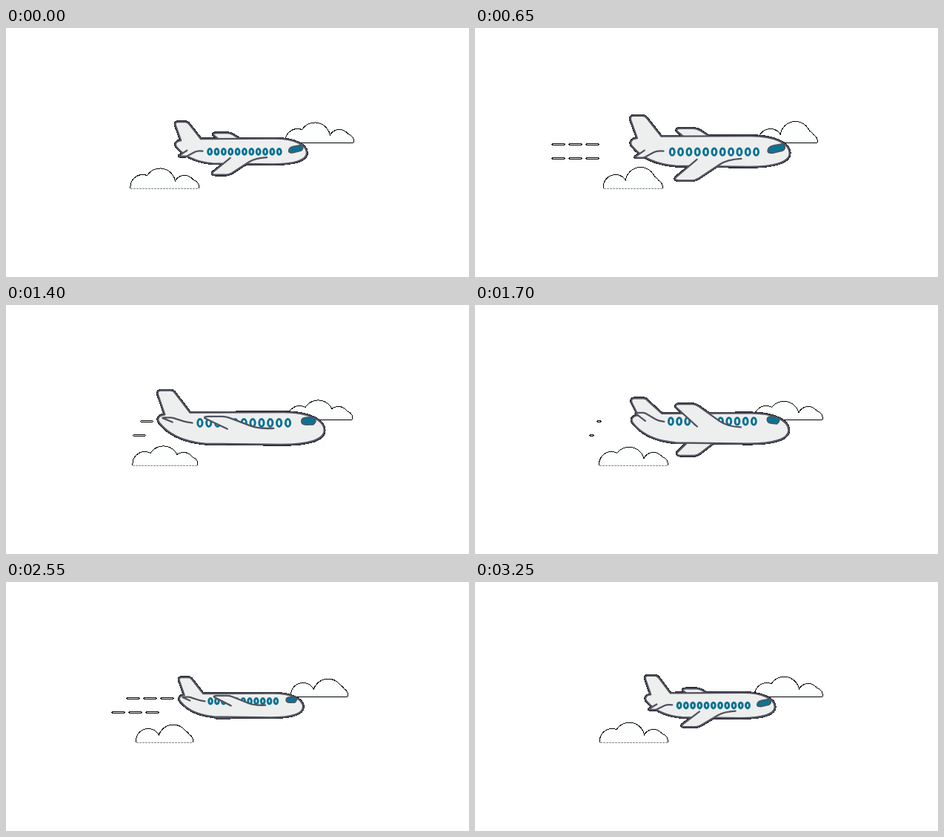
An HTML page for the animation above (3300 ms loop, 625x337 px).

```html
<!DOCTYPE html>
<html lang="en">
<head>
<meta charset="utf-8">
<title>Airplane</title>
<style>
  html, body { margin: 0; width: 100%; height: 100%; overflow: hidden; background: #fff; }
  svg { display: block; width: 625px; height: 337px; }
  .crisp, .rim { shape-rendering: crispEdges; }
  .skin { fill: #edefee; stroke: #53525f; stroke-width: 2.3; stroke-linejoin: round; stroke-linecap: round; }
  .rim { fill: none; stroke: #16161c; stroke-width: 3.8; stroke-linejoin: round; }
  .pane { fill: #f4f8f9; stroke: #0d7292; stroke-width: 3; }
  .skin, .rim, .pane { vector-effect: non-scaling-stroke; }
  .cockpit { fill: #0d7292; stroke-width: 1.5; }
  .edge { fill: none; stroke: #000; stroke-width: 2; }
  .puff { fill: #fdfefe; }
  .base, .trail { fill: none; stroke: #000; }
</style>
</head>
<body>
<svg viewBox="0 0 625 337">
  <defs><clipPath id="hull"><path id="hullShape"/></clipPath></defs>
  <g id="clouds" class="crisp"></g>
  <path id="trails" class="trail crisp"/>
  <g id="plane"></g>
</svg>
<script>
const LOOP = 3300, STEP = 50;
const NS = 'http://www.w3.org/2000/svg';
const $ = id => document.getElementById(id);
const clamp = v => Math.max(0, Math.min(1, v));
const wave = (t, peak, period = LOOP) => Math.cos(2 * Math.PI * (t - peak) / period);

function add(parent, tag, attrs) {
  const el = document.createElementNS(NS, tag);
  for (const name in attrs) el.setAttribute(name, attrs[name]);
  return parent.appendChild(el);
}

const clouds = [[0, 0, '3 1', '#888'], [209, -62, 'none', '#000']].map(([x, y, dash, stroke]) => {
  const g = add($('clouds'), 'g', { transform: `translate(${x} ${y})` });
  return {
    edge: add(g, 'path', { class: 'edge' }),
    puff: add(g, 'path', { class: 'puff' }),
    base: add(g, 'path', { class: 'base', style: `stroke:${stroke};stroke-dasharray:${dash}` })
  };
});

const plane = $('plane');
const part = className => add(plane, 'path', { class: className });
const rim = part('rim');
const far = part('skin');
const hull = part('skin');
const panes = Array.from({ length: 11 }, () => add(plane, 'ellipse', { class: 'pane', rx: 2.4, ry: 3.8 }));
const cockpit = part('skin cockpit');
cockpit.setAttribute('clip-path', 'url(#hull)');
const tail = part('skin');
const near = part('skin');

// A swept wing seen from the side: root position, size, tip and root heights
function wing(x, size, tip, root) {
  const span = tip - root, at = dx => x + dx * size;
  return `M${x} ${root}L${at(-23.5)} ${tip - span * .14}Q${at(-25)} ${tip} ${at(-20)} ${tip}`
    + `L${at(-5)} ${tip}Q${at(-2)} ${tip} ${at(2)} ${tip - span * .1}`
    + `L${at(24.5)} ${root + span * .25}Q${at(33)} ${root} ${at(48.5)} ${root - Math.sign(root) * .8}`;
}

function drawPlane(t, scale) {
  const roll = wave(t, 335);
  plane.setAttribute('transform', `translate(317.5 167) scale(${scale})`);

  const fin = -43 + 9.5 * roll * roll - 3 * roll;
  const body = 'M-53.5-16.5L45-17C70-17 87-9 87 2C87 12 70 17 42 17L-38 16'
    + 'C-60 14-76 6-85-5C-89-9-87-14-80-14.5'
    + `L-87 ${fin + 5}Q-88.5 ${fin} -84 ${fin}L-74 ${fin}Q-71 ${fin} -69 ${fin + 3}Z`;
  const farTip = 2 - 33 * roll;
  const farWing = wing(-13, 1, farTip, farTip * .12);
  const nearWing = wing(-14.5, 1, 3 + 35 * roll, 3.5 + 6.5 * roll);
  const tailWing = wing(-72, .43, 14.5 * roll - 5, 4.3 * roll - 4.7);
  hull.setAttribute('d', body);
  $('hullShape').setAttribute('d', body);
  far.setAttribute('d', farWing);
  near.setAttribute('d', nearWing);
  tail.setAttribute('d', tailWing);
  rim.setAttribute('d', body + farWing + nearWing + tailWing);

  panes.forEach((pane, i) => {
    pane.setAttribute('cx', 3.4 + 1.2 * roll + (i - 5) * 9.2);
    pane.setAttribute('cy', 5 * roll - 3.6);
  });

  const y = 3.8 * roll - 6, end = 81.6 + 3 * roll, h = 4.3 + .8 * roll, tilt = 1 + 2 * roll;
  cockpit.setAttribute('d', `M63 ${y + tilt}Q63 ${y - h + tilt} 69 ${y - h + tilt * .5}`
    + `L${end - 4} ${y - h - tilt * .3}Q${end} ${y} ${end - 5} ${y + h - tilt}`
    + `L68 ${y + h}Q63 ${y + h} 63 ${y + tilt}Z`);
}

function drawClouds(t) {
  const sway = peak => wave(t, peak, LOOP / 2);
  // Centre, radius and height of each bump
  const bumps = [
    [188 + 4 * sway(950), 16, 18],
    [217 + 9 * sway(850), 20, 25.5 + 2.5 * wave(t, 600)],
    [238 + 3 * sway(0), 14, 17],
    [247 + 4 * sway(0), 9, 11]
  ];
  const outline = bumps.map(([x, r, h]) => {
    const ry = Math.min(r, h), top = 217 - h + ry;
    return `M${x - r} 217V${top}A${r} ${ry} 0 0 1 ${x + r} ${top}V217`;
  }).join('');
  const left = Math.min(...bumps.map(([x, r]) => x - r));
  const right = Math.max(...bumps.map(([x, r]) => x + r));
  for (const { edge, puff, base } of clouds) {
    edge.setAttribute('d', outline);
    puff.setAttribute('d', outline);
    base.setAttribute('d', `M${left} 217.5H${right}`);
  }
}

// Bursts of speed lines: start, life, origin, reach, slant
const bursts = [
  [100, 970, 205, 128, 0],
  [1200, 530, 195, 35, 10],
  [2090, 800, 217, 80, 20]
];

function drawTrails(t) {
  let d = '';
  for (const [start, life, origin, reach, slant] of bursts) {
    const u = (t - start) / life;
    if (u <= 0 || u >= 1) continue;
    for (const side of [-1, 1]) {
      const x = origin - side * slant / 2, y = 167 + side * 9.5;
      const left = x - reach * clamp(u / .72), right = x - reach * clamp((u - .6) / .4);
      for (let i = 0; i < 3; i++) {
        const a = left + i * 23, b = Math.min(a + 17, right);
        if (b - a < 1) continue;
        d += `M${a + 1} ${y - 1}H${b - 1}L${b} ${y}L${b - 1} ${y + 1}H${a + 1}L${a} ${y}Z`;
      }
    }
  }
  $('trails').setAttribute('d', d);
}

function render(now) {
  const t = Math.floor(now % LOOP / STEP) * STEP;
  drawClouds(t);
  drawTrails(t);
  drawPlane(t, 1.125 + .185 * wave(t, 1150));
}

const start = performance.now();
function tick() {
  render(performance.now() - start);
  requestAnimationFrame(tick);
}
tick();
</script>
</body>
</html>
```
